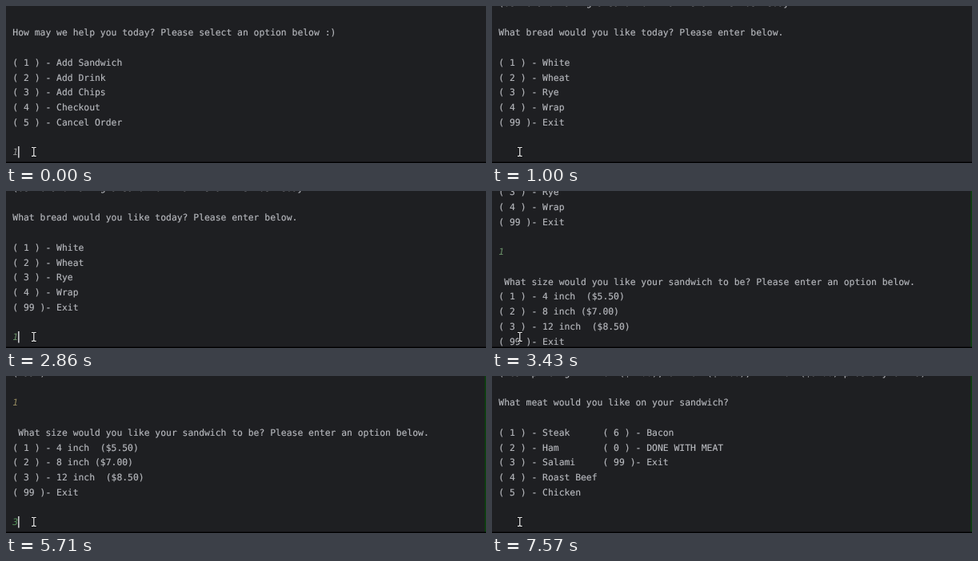
Animation, 600 px wide and 197 px high, one loop 8 s. Source, as an HTML page:

```html
<!DOCTYPE html>
<html lang="en">
<head>
<meta charset="utf-8">
<title>Sandwich order console</title>
<style>
  html, body { margin: 0; width: 100%; height: 100%; overflow: hidden; background: #1e1f22; }
  svg { display: block; }
  text {
    font: 11.38px "DejaVu Sans Mono", monospace;
    fill: #b7b9be;
    stroke: #b7b9be;
    stroke-width: 0.15px;
    white-space: pre;
    text-rendering: geometricPrecision;
  }
  .input { font-style: italic; stroke: none; }
</style>
</head>
<body>
<svg width="600" height="197" viewBox="0 0 600 197">
  <defs>
    <path id="beam" d="M32.5 177.5H33.8L34.8 178.3L35.8 177.5H37.1M34.8 178.3V187.5M32.5 188.3H33.8L34.8 187.5L35.8 188.3H37.1"/>
  </defs>
  <rect width="600" height="197" fill="#1e1f22"/>
  <g id="page"></g>
  <rect id="caret" width="1.4" height="14.5" fill="#e4e5e8"/>
  <g fill="none" stroke-linecap="square">
    <use href="#beam" stroke="#111214" stroke-width="2.8"/>
    <use href="#beam" stroke="#f0f0f0" stroke-width="1.2"/>
  </g>
  <rect id="edge" x="598.4" width="1.6" height="197" fill="#0c430e"/>
  <rect y="195.6" width="600" height="1.4" fill="#000"/>
</svg>
<script>
const LOOP = 8000, LEFT = 8.3, PITCH = 18.75, TOP_BASELINE = -0.2, CHAR = 6.85;

// Console lines by row number
const blocks = {
  2: ["How may we help you today? Please select an option below :)", "",
      "( 1 ) - Add Sandwich", "( 2 ) - Add Drink", "( 3 ) - Add Chips",
      "( 4 ) - Checkout", "( 5 ) - Cancel Order"],
  12: ["(So we are making a sandwich that is all for us today", "",
       "What bread would you like today? Please enter below.", "",
       "( 1 ) - White", "( 2 ) - Wheat", "( 3 ) - Rye", "( 4 ) - Wrap", "( 99 )- Exit"],
  24: [" What size would you like your sandwich to be? Please enter an option below.",
       "( 1 ) - 4 inch  ($5.50)", "( 2 ) - 8 inch ($7.00)",
       "( 3 ) - 12 inch  ($8.50)", "( 99 )- Exit"],
  32: ["(Meat pricing: 4 inch ($1.00), 8 inch ($2.00), 12 inch ($3.00) plus any extra)", "",
       "What meat would you like on your sandwich?", "",
       "( 1 ) - Steak      ( 6 ) - Bacon",
       "( 2 ) - Ham        ( 0 ) - DONE WITH MEAT",
       "( 3 ) - Salami     ( 99 )- Exit",
       "( 4 ) - Roast Beef", "( 5 ) - Chicken"]
};

// Each prompt: when its output appears, its scroll rows, the typed answer and the caret blinks
const prompts = [
  { from: 0, scroll: 0, answer: "1", typed: 0, blinks: [], steps: [1], color: "#929393" },
  { from: 290, scroll: 12, answer: "1", typed: 2860, blinks: [860, 1430, 1860, 2430],
    steps: [.25, .715, 1], color: "#6a9068" },
  { from: 3290, scroll: 20, answer: "3", typed: 5710, blinks: [4430, 5000, 5430],
    steps: [.25, .715, 1], color: "#56945c" },
  { from: 6430, scroll: 32, answer: "", typed: LOOP, blinks: [7570], steps: [.15, .45, .8, 1] }
];
const STEP = 142;
const $ = id => document.getElementById(id);
const baseline = row => TOP_BASELINE + row * PITCH;

function addLine(row, content) {
  const line = document.createElementNS("http://www.w3.org/2000/svg", "text");
  line.setAttribute("x", LEFT);
  line.setAttribute("y", baseline(row));
  line.textContent = content;
  return $("page").appendChild(line);
}

function addBlock(start, lines) {
  return lines.map((content, i) => addLine(start + i, content));
}

const output = Object.entries(blocks).map(([row, lines]) => addBlock(+row, lines));
const answers = prompts.map(p => {
  const line = addLine(p.scroll + 10, p.answer);
  line.classList.add("input");
  line.style.fill = p.color;
  return line;
});

function show(element, visible) {
  element.style.visibility = visible ? "visible" : "hidden";
}

function draw(t) {
  const index = prompts.findLastIndex(p => t >= p.from);
  const prompt = prompts[index];
  const previous = prompts[Math.max(0, index - 1)];
  const step = Math.min(prompt.steps.length - 1, Math.floor((t - prompt.from + 4) / STEP));
  const rows = previous.scroll + (prompt.scroll - previous.scroll) * prompt.steps[step];
  const offset = rows * PITCH;

  $("page").setAttribute("transform", `translate(0 ${-offset})`);
  output.forEach((lines, i) => lines.forEach(line => show(line, i <= index)));
  answers.forEach((line, i) => show(line, t >= prompts[i].typed));
  answers[1].style.fill = t < 3570 ? prompts[1].color : "#94895f";

  const typed = t >= prompt.typed;
  const blinkedOff = prompt.blinks.filter(time => t >= time).length % 2 === 1;
  $("caret").setAttribute("x", LEFT + 0.4 + (typed ? CHAR - 0.4 : 0));
  $("caret").setAttribute("y", baseline(prompt.scroll + 10) - 11.3 - offset);
  show($("caret"), typed || !blinkedOff);
  show($("edge"), t >= prompts[2].from);
}

const start = performance.now();
function tick() {
  draw((performance.now() - start) % LOOP);
  requestAnimationFrame(tick);
}
draw(0);
tick();
</script>
</body>
</html>
```
